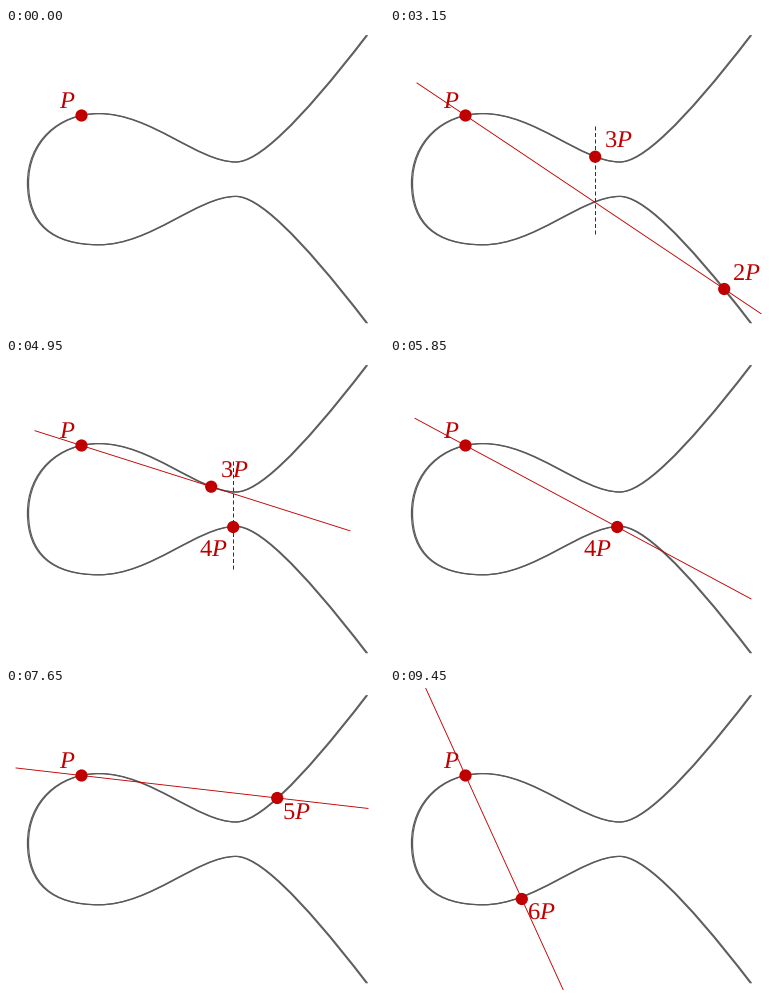
A matplotlib script for the animation above (9900 ms loop, 378 by 302 pixels).

```python
import matplotlib.pyplot as plt
from matplotlib.animation import FuncAnimation
from matplotlib.patches import Circle, PathPatch
from matplotlib.path import Path

W, H, DPI = 378, 302, 100
PX = 72 / DPI  # points per pixel
STEP_MS, STEPS = 450, 22
RED, GREY, DARK = "#c00000", "#595959", "#303030"

MID = 151.2          # mirror axis of the curve
BASE = (75.5, 87.5)  # the point P
ABOVE, BELOW, LEFT = (8.3, -9), (4.8, 21), (-34, 28.5)  # label offsets

plt.rcParams.update({
    "mathtext.fontset": "custom",
    "mathtext.rm": "Liberation Serif",
    "mathtext.it": "Liberation Serif:italic",
    "text.hinting": "none",
})

fig = plt.figure(figsize=(W / DPI, H / DPI), dpi=DPI, facecolor="white")
ax = fig.add_axes([0, 0, 1, 1])
ax.set_xlim(0, W)
ax.set_ylim(H, 0)
ax.axis("off")


def draw_half(side, roundness):
    """Branch above (side=-1) or below (side=1) the axis, right to left."""
    end, neck, bulge, tip = 361, 230, 93, 22
    top, tip_y = MID + side * 65.6, 155
    arm, span, nose = end - neck, neck - bulge, bulge - tip
    pts = [(end, MID + side * 144),
           (end - 0.54 * arm, MID + side * 52),
           (neck + 0.16 * arm, MID + side * 17.2),
           (neck, MID + side * 17.2),
           (neck - 0.28 * span, MID + side * 17.2),
           (bulge + 0.38 * span, top),
           (bulge, top),
           (bulge - roundness * nose, top),
           (tip, tip_y + roundness * (top - tip_y)),
           (tip, tip_y)]
    codes = [Path.MOVETO] + [Path.CURVE4] * (len(pts) - 1)
    # two shifted strokes: upright parts come out heavier than flat ones
    for dx in (-0.55, 0.55):
        path = Path([(x + dx, y) for x, y in pts], codes)
        ax.add_patch(PathPatch(path, fill=False, ec=GREY, lw=1.2 * PX,
                               capstyle="butt", zorder=1))


def chord(slope, x0, x1):
    px, py = BASE
    ys = [py + slope * (x - px) for x in (x0, x1)]
    return ax.plot([x0, x1], ys, color=RED, lw=0.9 * PX, zorder=2)


def drop(x, top, length, color):
    return ax.plot([x - 0.5] * 2, [top, top + length], color=color, lw=PX,
                   zorder=2, dashes=(4, 2.5), dash_capstyle="butt")


def point(x, y, label, offset):
    dot = ax.add_patch(Circle((x, y), 6.1, fc=RED, ec="none", zorder=4))
    text = ax.text(x + offset[0], y + offset[1], f"${label}$", color=RED,
                   fontsize=24.5 * PX, ha="left", va="baseline", zorder=5)
    return [dot, text]


draw_half(-1, 0.58)
draw_half(1, 0.66)
point(*BASE, "P", (-22.2, -7))

# next multiple of P, label side, top and length of its drop, chord ends
rounds = [
    ((334.2, 261), ABOVE, 17, 264, (15, 360)),
    ((205.2, 128.7), ABOVE, 98, 110, (27, 371)),
    ((227.2, 169), LEFT, 103, 110, (29, 344)),
    ((271.2, 110), BELOW, 73, 166, (25, 361)),
    ((131.8, 211), BELOW, 68, 166, (10, 362)),
]

spans = []  # (artist, first step, step after the last)


def show(artists, start, stop):
    spans.extend((a, start, stop) for a in artists)


slope = -0.176  # tangent at P; later chords run through the previous multiple
for i, ((x, y), side, top, length, ends) in enumerate(rounds):
    t = 4 * i
    show(chord(slope, *ends), t + 1, t + 4)
    show(drop(x, top, length, DARK if i else RED), t + 2, t + 4)
    show(point(x, y, f"{i + 2}P", side), t + 3, t + 8)
    slope = (y - BASE[1]) / (x - BASE[0])
show(chord(slope, 30, 180), STEPS - 1, STEPS)


def update(step):
    for artist, start, stop in spans:
        artist.set_visible(start <= step < stop)
    return [artist for artist, _, _ in spans]


anim = FuncAnimation(fig, update, frames=STEPS, interval=STEP_MS,
                     repeat=True, repeat_delay=0, blit=False)
plt.show()
```
